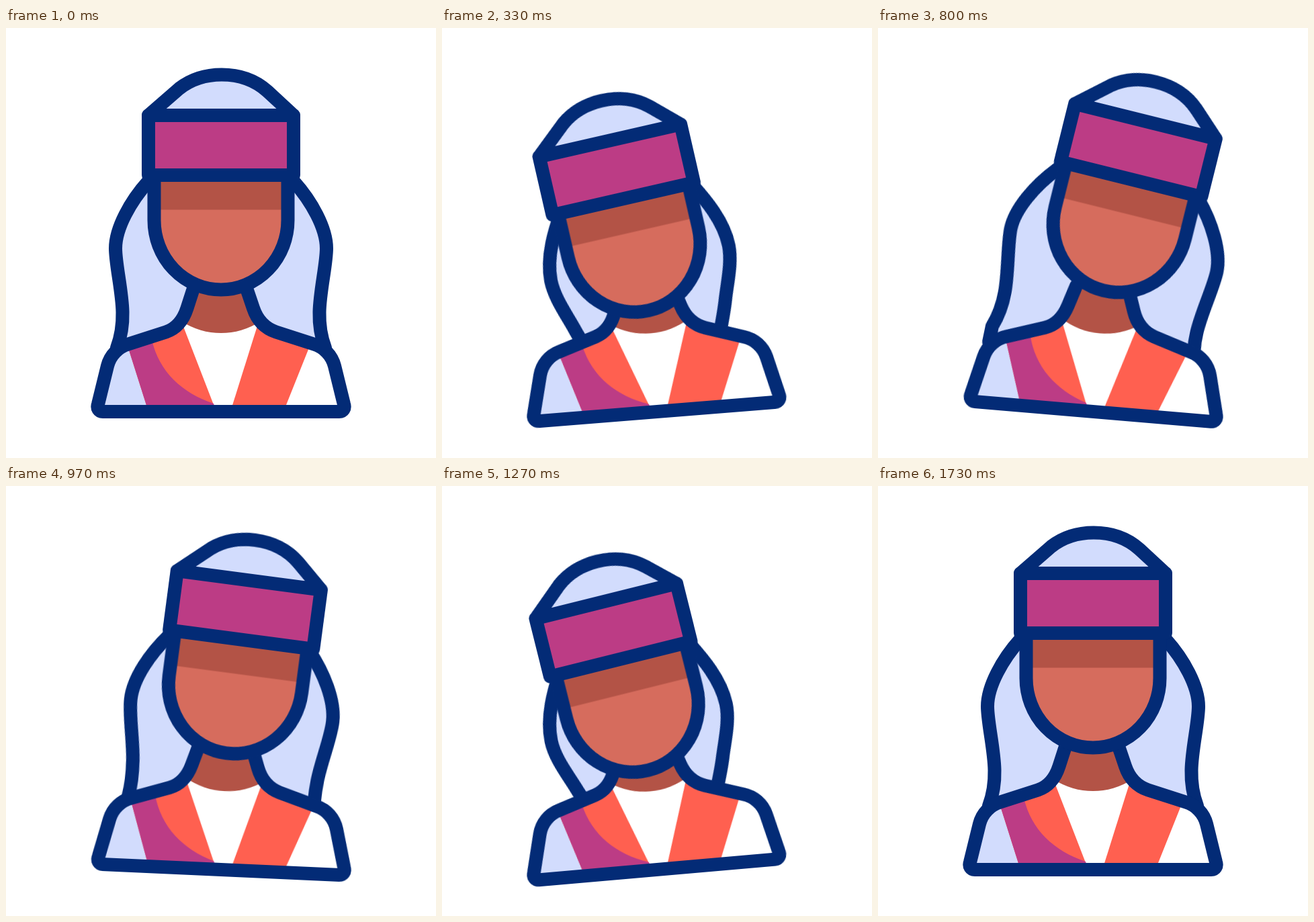
Recreate the animation shown at these times as an HTML page without scripts. Size 640x640 px, loop 2 s.

```html
<!DOCTYPE html>
<html lang="en">
<head>
<meta charset="utf-8">
<title>Swaying figure</title>
<style>
  html, body { margin: 0; width: 100%; height: 100%; overflow: hidden; background: #fff; }
  svg { display: block; width: 100vw; height: 100vh; }

  .line { stroke: #032b76; stroke-width: 20; stroke-linejoin: round; stroke-linecap: round; }
  .none { fill: none; }
  .light { fill: #d2dcfd; }
  .plum { fill: #bc3c85; }
  .coral { fill: #ff6050; }
  .skin { fill: #d66c5d; }
  .shade { fill: #b35346; }
  .white { fill: #fff; }

  .body, .head, .mane, .lock {
    animation: 2s cubic-bezier(.333, 0, .667, 1) infinite;
  }
  .body { transform-origin: 320px 571px; animation-name: sway; }
  .head { transform-origin: 320px 390px; animation-name: nod; }
  .mane { transform-origin: 320px 415px; animation-name: swing; }
  .lock { animation-name: squeeze; }

  @keyframes sway {
    0%, 83.5%, 100% { transform: rotate(0deg); }
    20%, 63.2% { transform: rotate(-5deg); }
    41.65% { transform: rotate(5deg); }
  }
  @keyframes nod {
    0%, 83.5%, 100% { transform: translateY(0px) rotate(0deg); }
    20%, 63.2% { transform: translateY(33px) rotate(-9deg); }
    41.65% { transform: translateY(0px) rotate(9.4deg); }
  }
  @keyframes swing {
    0%, 83.5%, 100% { transform: rotate(0deg); }
    20%, 63.2% { transform: rotate(-7.2deg); }
    41.65% { transform: rotate(7.2deg); }
  }
  @keyframes squeeze {
    0%, 41.65%, 83.5%, 100% {
      d: path("M318 228 L428 228 C455 258 477 298 477 328 C477 352 467 392 466.5 423 C466 445 469 460 475 476 L475 500 L318 500");
    }
    20%, 63.2% {
      d: path("M318 250 L418 250 C432 275 453 312 453 350 C453 375 441 400 432 425 C426 443 417 462 409 480 L409 500 L318 500");
    }
  }
</style>
</head>
<body>
<svg viewBox="0 0 640 640">
  <defs>
    <path id="torso" d="M279.5 386 L269.5 417 Q260.5 445 238 452.5 L182 470.5 C167 475 155 487 151 503 L137 560 C135 566 138 571 144 571 H496 C502 571 505 566 503 560 L489 503 C485 487 473 475 458 470.5 L402 452.5 Q377 444 368 417 L357.5 386"/>
    <clipPath id="inside"><use href="#torso"/></clipPath>
  </defs>

  <g class="body">
    <g class="mane">
      <path class="lock line light" d="M318 228 L428 228 C455 258 477 298 477 328 C477 352 467 392 466.5 423 C466 445 469 460 475 476 L475 500 L318 500"/>
      <g transform="translate(640 0) scale(-1 1)">
        <path class="lock line light" d="M318 228 L428 228 C455 258 477 298 477 328 C477 352 467 392 466.5 423 C466 445 469 460 475 476 L475 500 L318 500"/>
      </g>
    </g>

    <use href="#torso" class="white"/>
    <g clip-path="url(#inside)">
      <path class="light" d="M130 460 H178 L213 571 H130 Z"/>
      <path class="coral" d="M180 470 L260 434 L313 571 H212 Z"/>
      <path class="plum" d="M180 470 L217 464 C228 512 262 543 309 559 L313 571 H212 Z"/>
      <path class="coral" d="M377 434 L455 466 L413 571 H334 Z"/>
      <path class="shade" d="M279 380 L262 437 A107 107 0 0 0 378 437 L361 380 Z"/>
    </g>
    <use href="#torso" class="line none"/>

    <g class="head">
      <path class="skin" d="M220.5 219 V286 A99.5 103.5 0 0 0 419.5 286 V219 Z"/>
      <path class="shade" d="M221 219 H419 V270.5 H221 Z"/>
      <path class="line none" d="M220.5 219 V286 A99.5 103.5 0 0 0 419.5 286 V219"/>
      <path class="line light" d="M212 130 L258 90 C276 76 297 69.5 321 69.5 C346 69.5 370 77 389 94 L428 130 Z"/>
      <path class="line plum" d="M212 130 H428 V219 H212 Z"/>
    </g>
  </g>
</svg>
</body>
</html>
```
